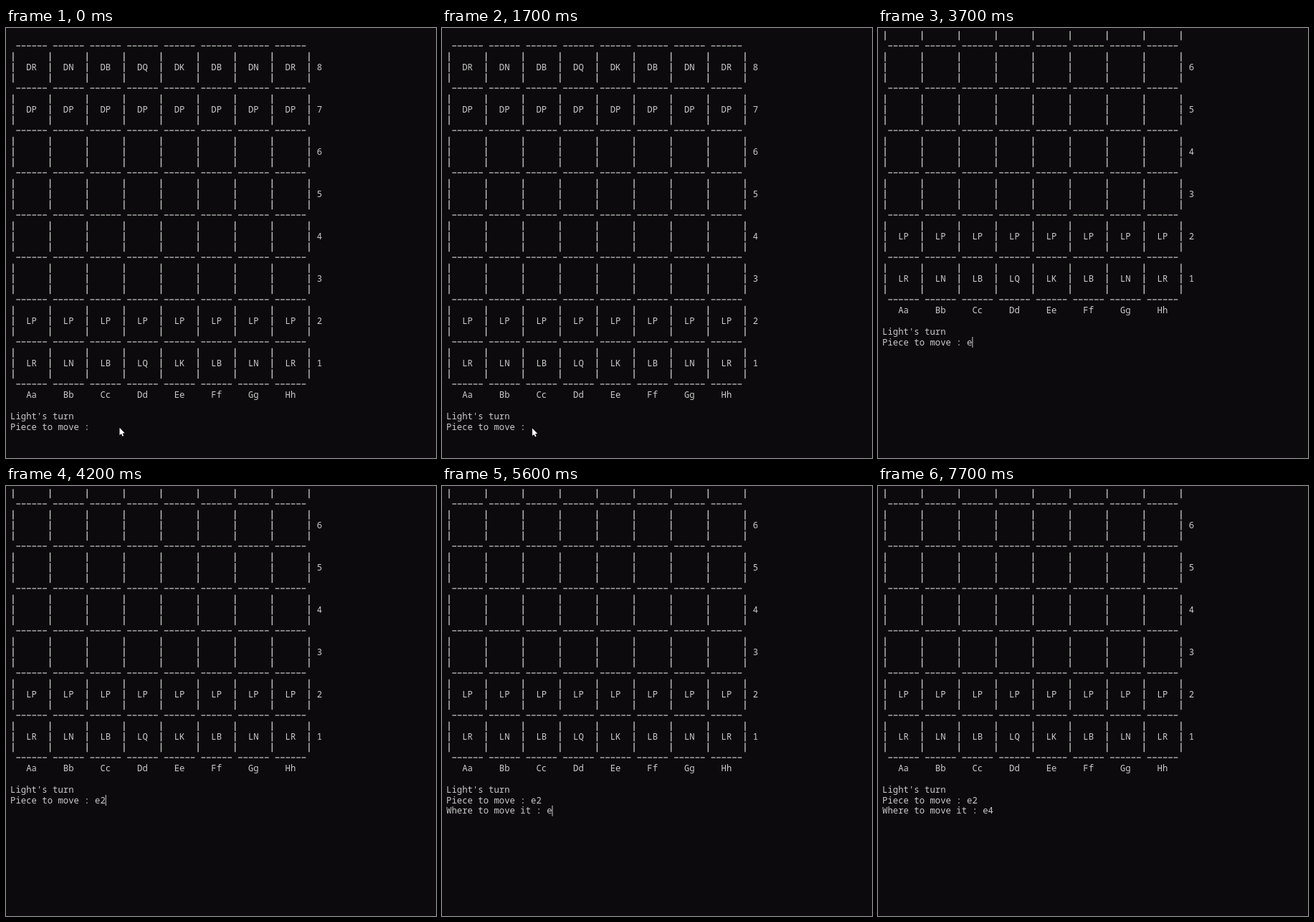
Recreate the animation shown at these times as an HTML page with a canvas. Size 600 by 600 pixels, loop 8000 ms.

```html
<!DOCTYPE html>
<html>
<head>
<meta charset="utf-8">
<style>
html, body { margin: 0; width: 100%; height: 100%; overflow: hidden; background: #0c0a0c; }
canvas { display: block; }
</style>
</head>
<body>
<canvas id="stage" width="600" height="600"></canvas>
<script>
const ctx = document.getElementById('stage').getContext('2d');
const LOOP = 8000, CHAR = 7.375, LINE = 14.75, LEFT = 6, TOP = 25;
const BG = '#0c0a0c', FG = '#cccccc';

// Console contents, one string per text line
const ranks = { 8: 'RNBQKBNR', 7: 'PPPPPPPP', 2: 'PPPPPPPP', 1: 'RNBQKBNR' };
const rule = ' ------'.repeat(8);
const bars = '|      '.repeat(8) + '|';
const board = [rule];
for (let r = 8; r > 0; r--) {
  const side = r > 4 ? 'D' : 'L';
  const cells = [...(ranks[r] || '        ')].map(p => p === ' ' ? '|      ' : `|  ${side}${p}  `);
  board.push(bars, cells.join('') + '| ' + r, bars, rule);
}
board.push([...'ABCDEFGH'].map(f => `   ${f}${f.toLowerCase()}  `).join(''), '', "Light's turn");

// [start, typed piece, typed target (null = not asked yet), caret shown]
const states = [
  [0, '', null, 0], [1300, '', null, 1], [1700, '', null, 0], [2200, '', null, 1],
  [2900, '', null, 0], [3500, '', null, 1], [3700, 'e', null, 1], [4100, 'e2', null, 1],
  [4600, 'e2', null, 0], [5000, 'e2', '', 1], [5600, 'e2', 'e', 1], [6000, 'e2', 'e', 0],
  [6800, 'e2', 'e4', 1], [7500, 'e2', 'e4', 0]
];

function drawLine(text, row) {
  const y = TOP + row * LINE;
  [...text].forEach((ch, i) => {
    const x = LEFT + i * CHAR;
    if (ch === '-') ctx.fillRect(x + 0.9, y - 0.6, 5.8, 1.2);
    else if (ch === '|') ctx.fillRect(x + 3.3, y - 6, 1.3, 13);
    else if (ch !== ' ') ctx.fillText(ch, x, y + 4.7);
  });
}

function drawPointer(x, y) {
  ctx.save();
  ctx.translate(x, y);
  ctx.beginPath();
  [[0, 0], [0, 10.5], [2.4, 8.4], [4, 12], [5.6, 11.3], [4.1, 7.8], [7.2, 7.6]]
    .forEach(p => ctx.lineTo(...p));
  ctx.closePath();
  ctx.strokeStyle = '#000';
  ctx.stroke();
  ctx.fillStyle = '#fff';
  ctx.fill();
  ctx.restore();
}

function draw(t) {
  const [, piece, target, caret] = states.findLast(s => s[0] <= t);
  const lines = [...board, 'Piece to move : ' + piece];
  if (target !== null) lines.push('Where to move it : ' + target);
  const scroll = t < 3700 ? 0 : 8;

  ctx.fillStyle = BG;
  ctx.fillRect(0, 0, 600, 600);
  ctx.fillStyle = FG;
  ctx.font = '12.28px "Noto Sans Mono", "DejaVu Sans Mono", monospace';
  lines.forEach((text, i) => {
    if (!scroll || i >= 7) drawLine(text, i - scroll);
  });

  const last = lines.length - 1;
  if (caret) {
    ctx.fillRect(LEFT + lines[last].length * CHAR, TOP + (last - scroll) * LINE - 7, 1, 15);
  }
  if (!scroll) {
    const step = Math.floor(t / 100) - 6;
    const k = Math.min(Math.max(step / 4, 0), 1);
    drawPointer(158.5 - 32.5 * k, 557.7 + 0.8 * k);
  }
}

function tick(now) {
  draw(now % LOOP);
  requestAnimationFrame(tick);
}
draw(0);
requestAnimationFrame(tick);
</script>
</body>
</html>
```
